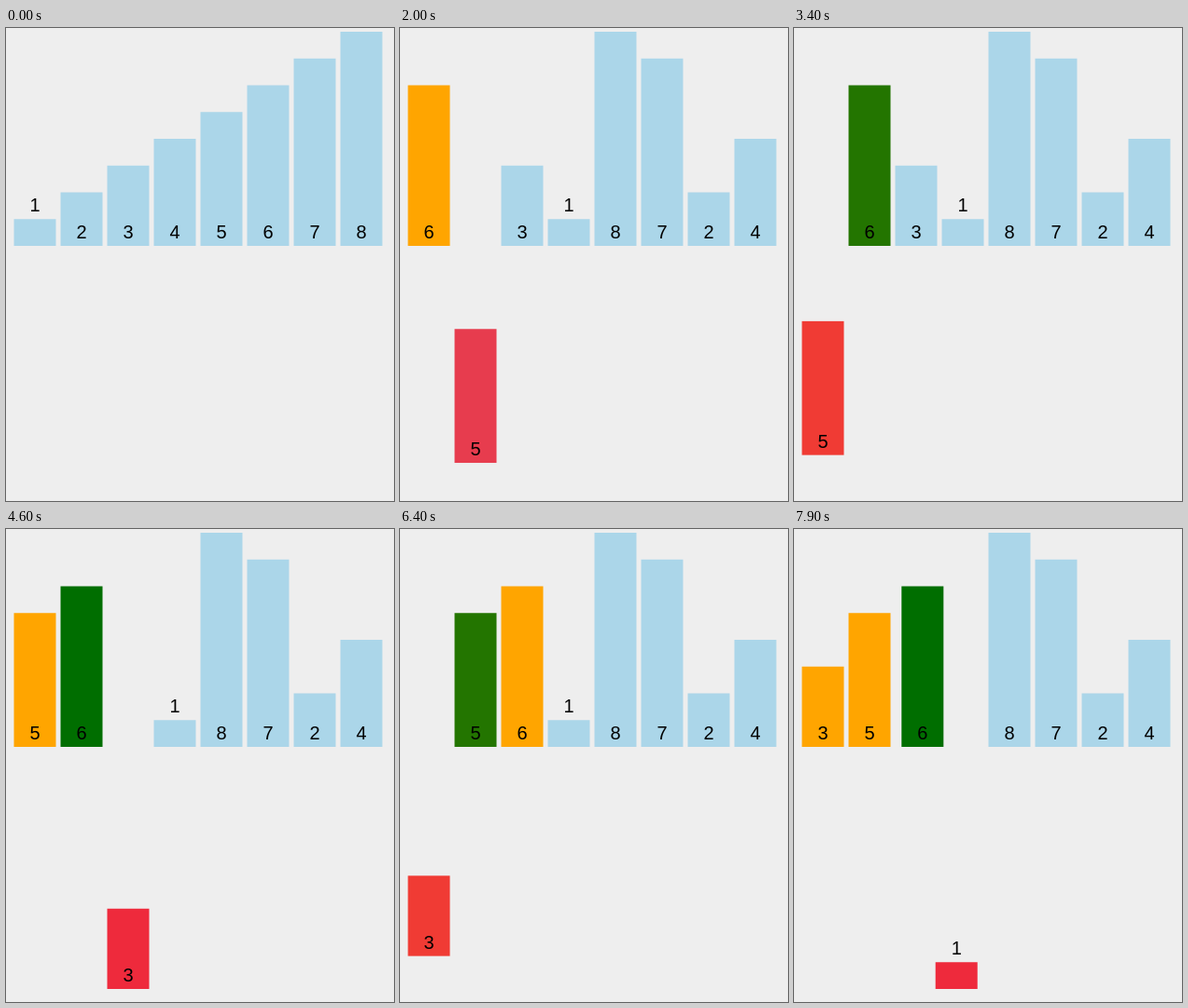
An HTML page with a canvas that plays this animation: 416 by 508 pixels, repeating every 8 s.

```html
<!DOCTYPE html>
<html lang="en">
<head>
<meta charset="utf-8">
<title>Insertion sort</title>
<style>
  html, body { margin: 0; width: 100%; height: 100%; overflow: hidden; background: #eee; }
  canvas { display: block; }
</style>
</head>
<body>
<canvas id="stage" width="416" height="508"></canvas>
<script>
const ctx = document.getElementById("stage").getContext("2d");

const LOOP = 8000, DURATION = 250, SHUFFLE_AT = 320;
const LEFT = 8.5, PITCH = 50, WIDTH = 45, BASE = 234, UNIT = 28.75, DROP = 260;
const BLUE = [171, 214, 233], ORANGE = [255, 165, 0], GREEN = [0, 110, 0], RED = [238, 42, 60];

const shuffled = [6, 5, 3, 1, 8, 7, 2, 4];

// Label centre: inside the bar foot, or above a bar too short to hold it.
const labelY = size => size === 1 ? BASE - UNIT - 15 : BASE - 15;
const sized = size => ({ size, label: labelY(size) });

const tint = color => ({ color });
const lower = { drop: DROP, color: RED };
const raise = { drop: 0, color: ORANGE };
const moveTo = slot => ({ slot });

// [start time, { bar value: properties to reach }]
const steps = [
  [SHUFFLE_AT, Object.fromEntries(shuffled.map(v => [v, sized(v)]))],
  [1320, { 6: tint(ORANGE) }],
  [1825, { 5: lower }],
  [2320, { 6: tint(GREEN) }],
  [2820, { 6: moveTo(1), 5: moveTo(0) }],
  [3320, { 5: raise, 6: tint(ORANGE) }],
  [3820, { 3: lower }],
  [4320, { 6: tint(GREEN) }],
  [4820, { 6: moveTo(2), 3: moveTo(1) }],
  [5314, { 5: tint(GREEN), 6: tint(ORANGE) }],
  [5820, { 5: moveTo(1), 3: moveTo(0) }],
  [6320, { 3: raise, 5: tint(ORANGE) }],
  [6820, { 1: lower }],
  [7320, { 6: tint(GREEN) }],
  [7820, { 6: moveTo(3), 1: moveTo(2) }]
];

const ease = t => t < 0.5 ? 4 * t ** 3 : 1 - 4 * (1 - t) ** 3;
const mix = (a, b, k) => Array.isArray(a) ? a.map((v, i) => mix(v, b[i], k)) : a + (b - a) * k;

function barAt(value, index, time) {
  const bar = { ...sized(index + 1), slot: index, drop: 0, color: BLUE };
  for (const [start, goals] of steps) {
    if (time < start) break;
    const k = ease(Math.min(1, (time - start) / DURATION));
    const goal = goals[value] || {};
    for (const key in goal) bar[key] = mix(bar[key], goal[key], k);
  }
  bar.text = time < SHUFFLE_AT ? index + 1 : value;
  return bar;
}

function drawBar({ size, label, slot, drop, color, text }) {
  const x = LEFT + slot * PITCH, height = size * UNIT;
  ctx.fillStyle = `rgb(${color.map(Math.round).join(",")})`;
  ctx.fillRect(x, BASE + drop - height, WIDTH, height);
  ctx.fillStyle = "#000";
  ctx.fillText(text, x + WIDTH / 2, label + drop + 7);
}

function draw(now) {
  const time = now % LOOP;
  ctx.fillStyle = "#eee";
  ctx.fillRect(0, 0, 416, 508);
  ctx.font = '20px "Liberation Sans", Arial, sans-serif';
  ctx.textAlign = "center";
  shuffled.forEach((value, i) => drawBar(barAt(value, i, time)));
}

const origin = performance.now();
function tick() {
  draw(performance.now() - origin);
  requestAnimationFrame(tick);
}
tick();
</script>
</body>
</html>
```
